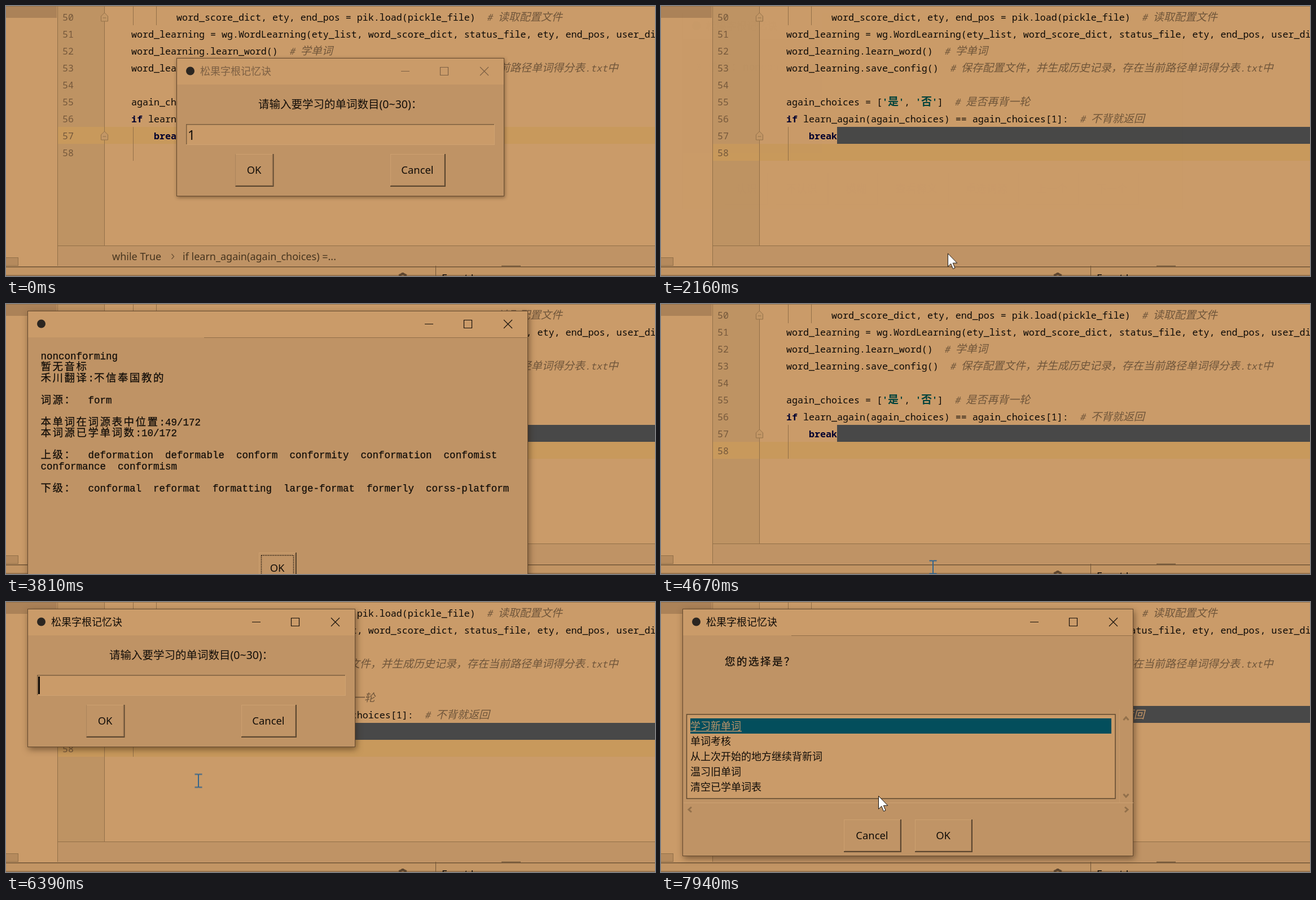
Animation, 1150 px wide and 478 px high, one loop 8000 ms. Source, as an HTML page:

```html
<!DOCTYPE html>
<html lang="zh">
<head>
<meta charset="utf-8">
<title>单词学习</title>
<style>
  html, body { margin: 0; width: 100%; height: 100%; overflow: hidden; background: #ca9b69; }
  svg { display: block; width: 1150px; height: 478px; }
  text { white-space: pre; font: 18px "Noto Sans", "Noto Sans CJK SC", sans-serif; fill: #120d08; }
  .z { font-family: "Noto Sans CJK SC", "Noto Sans CJK", sans-serif; }
  .code { font: 16.67px "Noto Sans Mono", "DejaVu Sans Mono", monospace; fill: #0c0906; }
  .code .z { font-size: 19px; }
  .num { fill: #76593c; }
  .key { font-weight: 700; fill: #00002e; }
  .str { font-weight: 700; fill: #00433c; }
  .note { font-style: italic; font-weight: 300; fill: #70563b; }
  .picked, .picked tspan { fill: #bd946a; }
  .crumb { fill: #47351f; }
  .mono { font: 17.5px "Liberation Mono", monospace; stroke: #120d08; stroke-width: .25; }
  .mono .z { font-size: 18.5px; letter-spacing: 2.5px; }
  .prompt { font-size: 19.5px; }
  .label { font-size: 18.4px; text-anchor: middle; }
  .edge { fill: #bf9365; stroke: #64492e; }
  .on .edge { filter: drop-shadow(2px 4px 6px rgba(40, 22, 6, .5)); }
  .off .edge { filter: drop-shadow(1px 2px 3px rgba(40, 22, 6, .45)); }
  .ctl { fill: none; stroke: #17110b; stroke-width: 1.2; }
  .off .ctl { stroke: #7d6044; }
  .off .title { fill: #7d6044; }
  .thin { fill: none; stroke: #927049; }
  .chev { fill: none; stroke: #92704b; stroke-width: 3; }
</style>
</head>
<body>
<svg id="stage" viewBox="0 0 1150 478"></svg>
<script>
const LOOP = 8000;
const APP = '松果字根记忆诀';

const cjk = s => s.replace(/[\u3000-\uffff]+/g, m => `<tspan class="z">${m}</tspan>`);
const text = (x, y, s, cls = '') => `<text x="${x}" y="${y}" class="${cls}">${cjk(s)}</text>`;
const rect = (x, y, w, h, fill) => `<rect x="${x}" y="${y}" width="${w}" height="${h}" fill="${fill}"/>`;
const path = (d, cls, extra = '') => `<path d="${d}" class="${cls}" ${extra}/>`;
const group = (id, body, cls = '') => `<g id="${id}" class="${cls}">${body}</g>`;
const span = (cls, s) => `<tspan class="${cls}">${s}</tspan>`;
const key = s => span('key', s), str = s => span('str', s), note = s => span('note', s);

// ---- editor ----
const LINES = [
  [302, 'word_score_dict, ety, end_pos = pik.load(pickle_file)  ' + note('# 读取配置文件')],
  [222, 'word_learning = wg.WordLearning(ety_list, word_score_dict, status_file, ety, end_pos, user_dict)'],
  [222, 'word_learning.learn_word()  ' + note('# 学单词')],
  [222, 'word_learning.save_config()  ' + note('# 保存配置文件，并生成历史记录，存在当前路径单词得分表.txt中')],
  [222, ''],
  [222, `again_choices = [${str("'是'")}, ${str("'否'")}]  ` + note('# 是否再背一轮')],
  [222, key('if') + ' learn_again(again_choices) == again_choices[1]:  ' + note('# 不背就返回')],
  [262, key('break')],
  [262, '']
];
const codeLine = (i, cls = '') => text(LINES[i][0], 26 + 30 * i, LINES[i][1], 'code ' + cls);
const fold = y => path(`M168.500 ${y - 2}L174.500 ${y - 8}L180.500 ${y - 2}V${y + 7}H168.500ZM171.500 ${y + 1}H177.500`,
  'thin', 'style="fill:#c39766"');
const loopCrumb = text(188, 450, 'while True', 'crumb');
const crumbs = loopCrumb
  + path('M293.500 439l4 4.500l-4 4.500', '', 'fill="none" stroke="#6b5136" stroke-width="1.300"')
  + text(313, 450, 'if learn_again(again_choices) =...', 'crumb');

const editor =
  rect(0, 0, 1150, 478, '#ca9b69') + rect(0, 0, 90, 21, '#ab8258')
  + rect(92, 0, 82, 425, '#be9363') + rect(92, 425, 1058, 35, '#bf9365')
  + group('edit0', rect(92, 214, 1058, 30, '#c8995c') + crumbs)
  + group('edit1', rect(92, 244, 1058, 30, '#c8995c') + rect(312, 214, 838, 30, '#484848'))
  + group('edit2', rect(222, 184, 928, 30, '#484848') + loopCrumb)
  + path('M91.500 0V460M174.500 0V425M225.500 0V34M266.500 0V34M225.500 214V274M92 424.500H1150M0 .5H1150', 'thin')
  + fold(20) + fold(230)
  + LINES.map((l, i) => text(100, 26 + 30 * i, String(50 + i), 'code num') + codeLine(i)).join('')
  + group('pick56', codeLine(6, 'picked'))
  + `<rect x="-.5" y="445.500" width="22" height="14" fill="#b58a5d" stroke="#927049"/>`
  + rect(0, 462, 1150, 16, '#c29564') + rect(0, 461, 1150, 1.500, '#6e5336') + rect(0, 476.500, 1150, 1, '#6e5336')
  + rect(761, 460, 1, 18, '#6e5336') + rect(878, 459.500, 34, 1.500, '#7d6041')
  + `<circle cx="703" cy="480" r="5.500" fill="none" stroke="#5e462f" stroke-width="4"/>`
  + path('M701 472h4v4h-4zM695 476l3 -2l3 4zM711 476l-3 -2l-3 4z', '', 'fill="#5e462f"')
  + text(772, 488, 'Event Log');

// ---- dialogs ----
function frame(x, y, w, h, title, seam) {
  const r = x + w, m = y + 23;
  return `<rect x="${x - .5}" y="${y + .5}" width="${w}" height="${h}" class="edge"/>`
    + rect(x, y + 1, w - 1, 46, '#ca9b69')
    + (seam ? path(`M${x + seam} ${y + 47.500}H${r}`, 'thin') : '')
    + `<circle cx="${x + 23.500}" cy="${m}" r="7.500" fill="#2b2621"/>`
    + text(x + 41, y + 29.500, title, 'title')
    + path(`M${r - 183} ${m + .5}h15M${r - 113.500} ${m - 6.500}h14v14h-14zM${r - 43} ${m - 7}l15 15m0 -15l-15 15`, 'ctl');
}

function button(x, y, w, h, label) {
  return rect(x, y, w, h, '#5c4730') + rect(x, y, w - 2, h - 2, '#cda06f')
    + rect(x + 1, y + 1, w - 3, h - 3, '#a98158') + rect(x + 1, y + 1, w - 4, h - 4, '#c09466')
    + text(x + w / 2 - 1, y + h / 2 + 6, label, 'label');
}

const numberBox = (x, y, extra) => frame(x, y, 580, 244, APP)
  + text(x + 144, y + 89, '请输入要学习的单词数目(0~30)：', 'prompt')
  + rect(x + 16, y + 117, 547, 37, '#cfa271') + rect(x + 16, y + 117, 546, 36, '#7c5f41')
  + rect(x + 17.500, y + 118.500, 544.500, 34.500, '#ca9b69')
  + button(x + 103.500, y + 170, 68, 58, 'OK') + button(x + 378, y + 170, 98, 58, 'Cancel') + extra;
const digit = (x, y) => `<text x="${x}" y="${y}" style="font-size:23px">1</text>`;

const ROWS = ['学习新单词', '单词考核', '从上次开始的地方继续背新词', '温习旧单词', '清空已学单词表'];
const listBox = frame(39, 12, 798, 437, APP, 192)
  + text(113, 112, '您的选择是？', 'mono')
  + '<rect x="45.500" y="199" width="759.500" height="149" fill="#ca9b69" stroke="#5f482f" stroke-width="1.500"/>'
  + rect(52, 206, 746, 27, '#034e5c')
  + ROWS.map((s, i) => text(52, 225.500 + 27 * i, s, i ? '' : 'picked')).join('')
  + group('under0', rect(52, 228, 91, 1.500, '#bd946a')) + group('under2', rect(52, 283, 234, 1.500, '#120d08'))
  + rect(40, 355, 797, 1, '#cda172') + rect(812, 190, 1, 165, '#c79a6b')
  + path('M819.500 209l4.500-5l4.500 5M819.500 340l4.500 5l4.500-5M54 363l-5 4.500l5 4.500M822 363l5 4.500l-5 4.500', 'chev')
  + button(324, 385, 102, 58, 'Cancel') + button(450, 385, 102, 58, 'OK');

const CHOICES = [['认识', 114, 76], ['不认识', 203, 94], ['模糊', 309, 76], ['查看释义', 397, 113],
  ['重选词源', 522, 112], ['上一个', 646, 95], ['下一个', 753, 94]];
const wordBox = frame(39, 12, 886, 347, APP, 312)
  + text(61.500, 114, '0 单词：nonconforming', 'mono')
  + CHOICES.map(([s, x, w]) => button(x, 295, w, 58, s)).join('');

const DETAIL = ['nonconforming', '暂无音标', '禾川翻译:不信奉国教的', '', '词源：  form', '',
  '本单词在词源表中位置:49/172', '本词源已学单词数:10/172', '',
  '上级：  deformation  deformable  conform  conformity  conformation  confomist',
  'conformance  conformism', '',
  '下级：  conformal  reformat  formatting  large-format  formerly  corss-platform'];
const detailBox = frame(39, 12, 886, 520, '', 312)
  + DETAIL.map((s, i) => text(61.500, 97.500 + 19.550 * i, s, 'mono')).join('')
  + button(448, 440, 67, 56, 'OK')
  + '<rect x="452.500" y="445" width="57" height="46" fill="none" stroke="#1c140c" stroke-width="1.500" stroke-dasharray="1.500 1.500"/>';

// ---- pointer ----
const pointer =
  group('arrow', '<path d="M.5 .5V23.500L5.800 18.500L9.500 27.500L13 26L9.300 17.300H16.800Z" fill="#fff" stroke="#15100b"/>')
  + group('beam', '<path d="M-6.500 -11.500H-1.500Q0 -11.500 0 -10Q0 -11.500 1.500 -11.500H6.500M-6.500 11.500H-1.500Q0 11.500 0 10Q0 11.500 1.500 11.500H6.500M0 -10V10" fill="none" stroke="#34658c" stroke-width="2"/>');

document.getElementById('stage').innerHTML = editor
  + group('num0', numberBox(303, 92, digit(322, 237)), 'off')
  + group('list', listBox, 'on')
  + group('word0', wordBox, 'off')
  + group('detail', detailBox, 'on')
  + group('word1', wordBox, 'on')
  + group('num1', numberBox(39, 12, group('caret', rect(57, 132, 3, 31, '#0c0906'))
      + group('typed', digit(58, 157))), 'on')
  + group('pointer', pointer);

// ---- motion: tracks are [ms, value] pairs, held before the first and after the last ----
function track(id, prop, keys) {
  const all = [[0, keys[0][1]], ...keys, [LOOP, keys.at(-1)[1]]];
  document.getElementById(id).animate(
    all.map(([t, v]) => ({ offset: t / LOOP, [prop]: v })),
    { duration: LOOP, iterations: Infinity });
}
// Turns an element on for the given [from, to] spans, with fades of `soft` ms.
function show(id, soft, ...spans) {
  const keys = [];
  for (const [a, b] of spans) {
    if (a > 0) keys.push([a, 0], [a + soft, 1]); else keys.push([0, 1]);
    if (b < LOOP) keys.push([b, 1], [b + soft, 0]);
  }
  track(id, 'opacity', keys);
}

show('edit0', 0, [0, 150]);
show('edit1', 0, [150, 7330]);
show('edit2', 0, [7330, LOOP]);
show('pick56', 0, [7330, LOOP]);
show('num0', 140, [0, 70]);
show('list', 160, [380, 1860], [7390, LOOP]);
show('under2', 0, [760, 2100]);
show('under0', 0, [0, 760], [2100, LOOP]);
show('word0', 160, [2160, 3190]);
show('detail', 160, [3420, 4300]);
show('word1', 90, [5460, 6000]);
show('num1', 130, [6170, 7250]);
show('caret', 0, [0, 6950]);
show('typed', 0, [6950, LOOP]);
show('arrow', 0, [400, 4400], [5500, 6080], [6560, LOOP]);
show('beam', 0, [4400, 5500], [6080, 6560]);

const move = [
  [400, 300, 340], [830, 193, 258], [920, 193, 258], [1290, 426, 300], [1370, 426, 300],
  [1600, 572, 426], [1690, 530, 420], [1860, 530, 420], [2200, 505, 440], [2480, 469, 354],
  [2700, 469, 354], [2860, 300, 338], [3010, 300, 338], [3090, 401, 325], [3180, 401, 325],
  [3500, 475, 440], [3700, 485, 500], [3960, 485, 500], [4100, 482, 466], [4750, 482, 466],
  [5140, 497, 356], [5300, 497, 349.500], [5450, 497, 349.500], [5900, 341, 316.500], [6470, 341, 316.500],
  [6780, 200, 190], [6950, 200, 190], [7100, 190, 201], [7250, 190, 201], [7630, 262, 256],
  [7800, 262, 256], [7940, 385, 343]
];
track('pointer', 'transform', move.map(([t, x, y]) => [t, `translate(${x}px, ${y}px)`]));
</script>
</body>
</html>
```
